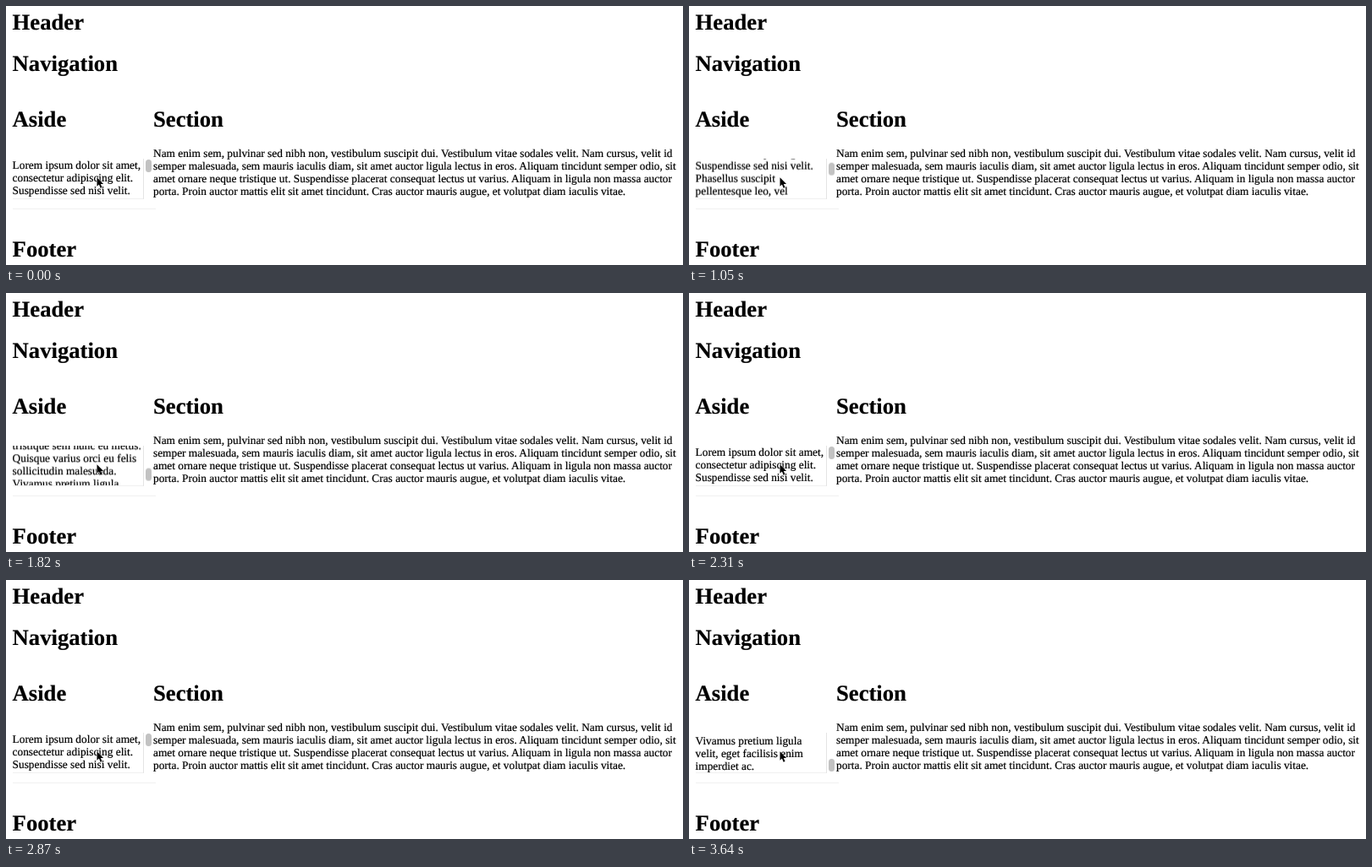
These frames come from a looping animation (800 px wide and 307 px high, 3990 ms). An HTML page:

```html
<!DOCTYPE html>
<html lang="en">
<head>
<meta charset="utf-8">
<title>Scrolling aside</title>
<style>
  html, body { margin: 0; width: 100%; height: 100%; overflow: hidden; background: #fff; }
  body {
    position: relative; color: #000;
    font: 13.333px/15px "Liberation Serif", Times, serif;
    text-rendering: geometricPrecision;
    -webkit-text-stroke: .2px #000;
  }
  h1, p, .box, .line, .thumb, svg { position: absolute; margin: 0; }
  h1 { left: 7.6px; font-size: 26.667px; line-height: 30px; }
  p { white-space: pre; }
  .section { left: 174px; }
  .box { left: 0; top: 181px; width: 162px; height: 47px; overflow: hidden; }
  .box p { left: 7.6px; top: 0; }
  .line { background: #f0f0f0; }
  .thumb { left: 165px; top: 182px; width: 7px; height: 15px; border-radius: 3.5px; background: #c2c2c2; }
  svg { left: 106px; top: 202px; }
</style>
</head>
<body>
<h1 style="top:4px">Header</h1>
<h1 style="top:53px">Navigation</h1>
<h1 style="top:119px">Aside</h1>
<h1 class="section" style="top:119px">Section</h1>
<h1 style="top:273px">Footer</h1>

<p class="section" style="top:167px">Nam enim sem, pulvinar sed nibh non, vestibulum suscipit dui. Vestibulum vitae sodales velit. Nam cursus, velit id
semper malesuada, sem mauris iaculis diam, sit amet auctor ligula lectus in eros. Aliquam tincidunt semper odio, sit
amet ornare neque tristique ut. Suspendisse placerat consequat lectus ut varius. Aliquam in ligula non massa auctor
porta. Proin auctor mattis elit sit amet tincidunt. Cras auctor mauris augue, et volutpat diam iaculis vitae.</p>

<div class="box"><p id="text">Lorem ipsum dolor sit amet,
consectetur adipiscing elit.
Suspendisse sed nisi velit.
Phasellus suscipit
pellentesque leo, vel
efficitur nulla dapibus
vitae. Donec a mauris at
sapien luctus gravida.
Integer non tortor quis
lectus porta aliquet. Sed
dapibus magna in lacus
feugiat, at mollis nibh
posuere. Mauris vel justo
tristique sem nunc eu metus.
Quisque varius orci eu felis
sollicitudin malesuada.
Vivamus pretium ligula
velit, eget facilisis enim
imperdiet ac.</p></div>

<div class="line" style="left:162px;top:181px;width:1px;height:48px;background:#e4e4e4"></div>
<div class="line" style="left:8px;top:228px;width:154px;height:1px"></div>
<div class="line" style="left:8px;top:240px;width:169px;height:1px"></div>
<div class="thumb" id="thumb"></div>

<svg width="11" height="16" viewBox="0 0 12 18">
  <path d="M1.5 1.5V13.3L4.2 10.8L6.2 15.5L8.3 14.6L6.3 10H10Z" fill="#000" stroke="#fff" stroke-linejoin="round" paint-order="stroke"/>
</svg>

<script>
  const LOOP = 3990, TICK = 70, END = 238, TRAVEL = 30;

  // Start and end of each scroll in ms, alternating down and up
  const moves = [[890, 1400], [1750, 1960], [2310, 2520], [2730, 2870], [3220, 3640]];

  const clamp = u => Math.min(1, Math.max(0, u));
  const ease = u => u < .5 ? 4 * u ** 3 : 1 - 4 * (1 - u) ** 3;

  // Share of the full scroll range at time t
  const scrollAt = t => moves.reduce((sum, [start, end], i) =>
    sum + (i % 2 ? -1 : 1) * ease(clamp((t - start) / (end - start))), 0);

  function play(id, distance) {
    const frames = [];
    for (let t = 0; t <= LOOP; t += TICK) {
      const y = scrollAt(t) * distance;
      frames.push({ offset: t / LOOP, transform: `translateY(${y.toFixed(1)}px)`, easing: "step-end" });
    }
    document.getElementById(id).animate(frames, { duration: LOOP, iterations: Infinity });
  }

  play("text", -END);
  play("thumb", TRAVEL);
</script>
</body>
</html>
```
